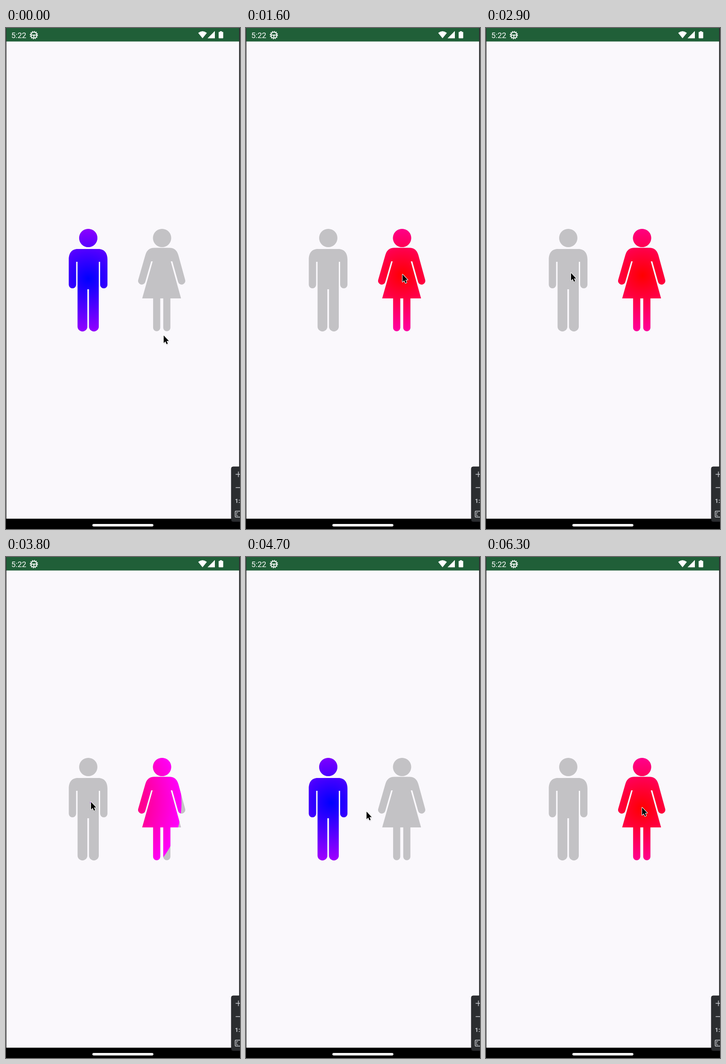
An HTML page for the animation above (6400 ms loop, 512 by 1095 pixels).

```html
<!DOCTYPE html>
<html lang="en">
<head>
<meta charset="utf-8">
<title>Gender picker</title>
<style>
  html, body { margin: 0; width: 100%; height: 100%; overflow: hidden; background: #2c2d2f; }
  svg { display: block; width: 100%; height: 100%; }
  text { font-family: Roboto, sans-serif; }
</style>
</head>
<body>
<svg viewBox="0 0 512 1095">
  <defs>
    <path id="man" d="M200 459a20 20 0 1 1-40 0a20 20 0 1 1 40 0Z
      M157 483H202C215 483 222 492 222 506V561a8 8 0 0 1-16 0V511H203V652.5a10.7 10.7 0 0 1-21.4 0V571H178V652.5a10.7 10.7 0 0 1-21.4 0V511H153.4V561a8 8 0 0 1-16 0V506C137.4 492 144 483 157 483Z"/>
    <path id="woman" d="M361.5 459a20 20 0 1 1-40 0a20 20 0 1 1 40 0Z
      M324 480.5H358C368 480.5 374 486 377 496L392 550.5a8 8 0 0 1-15.4 4.4L364 510H360.5L383 591H359.7V655a7.8 7.8 0 0 1-15.6 0V591H337.5V655a7.8 7.8 0 0 1-15.6 0V591H298L321 510H317.6L304.7 554.9a8 8 0 0 1-15.4-4.4L305 496C308 486 314 480.5 324 480.5Z"/>
    <clipPath id="manClip"><use href="#man"/></clipPath>
    <clipPath id="womanClip"><use href="#woman"/></clipPath>
    <radialGradient id="manFill" gradientUnits="userSpaceOnUse">
      <stop offset="0" stop-color="#00f"/><stop offset="1" stop-color="#f0f"/>
    </radialGradient>
    <radialGradient id="womanFill" gradientUnits="userSpaceOnUse">
      <stop offset="0" stop-color="#f00"/><stop offset="1" stop-color="#f0f"/>
    </radialGradient>
    <filter id="soft" x="-50%" y="-50%" width="200%" height="200%"><feGaussianBlur stdDeviation="1.2"/></filter>
  </defs>

  <rect width="512" height="1095" fill="#2c2d2f"/>
  <rect x="1" y="29" width="509" height="1044" fill="#faf8fc"/>

  <!-- status bar -->
  <rect x="1" width="509" height="29.5" fill="#205f38"/>
  <g fill="#fff">
    <text x="11.5" y="21.5" font-size="17">5:22</text>
    <g fill="none" stroke="#fff">
      <circle cx="61" cy="15.5" r="6.4" stroke-width="1.8"/>
      <circle cx="61" cy="15.5" r="8" stroke-width="2" stroke-dasharray="2.1 2.09"/>
      <path d="M55 15.5H67M61 15.5V21" stroke-width="1.9"/>
    </g>
    <path d="M420.5 10.8Q430 3.4 439.5 10.8L430 22.5Z"/>
    <path d="M441 22.5L457 6.5V22.5Z"/>
    <path d="M468.3 7h4v1.6h2q1 0 1 1V21.5q0 1-1 1h-8q-1 0-1-1V9.6q0-1 1-1h2Z"/>
  </g>

  <!-- figures -->
  <g fill="#c3c2c5"><use href="#man"/><use href="#woman"/></g>
  <g clip-path="url(#manClip)"><circle id="manSpot" fill="url(#manFill)"/></g>
  <g clip-path="url(#womanClip)"><circle id="womanSpot" fill="url(#womanFill)"/></g>

  <!-- navigation bar -->
  <rect y="1072.5" width="512" height="22.5" fill="#000"/>
  <rect x="189" y="1084" width="133.500" height="5.500" rx="2.750" fill="#fff"/>

  <!-- zoom panel -->
  <rect x="493" y="959" width="30" height="120" rx="4" fill="#2b2d30" stroke="#1e1f22"/>
  <g fill="none" stroke="#c9cbd0" stroke-width="1.500">
    <path d="M502.500 975.500H514M508.500 969.500V981.500M502.500 1004.500H514"/>
    <rect x="501.500" y="1056" width="14" height="13" rx="1"/>
    <path d="M504.500 1062.500V1059H508M504.500 1063V1066H508" stroke-width="1.200"/>
  </g>
  <text x="501" y="1038" font-size="13" font-weight="700" fill="#c9cbd0">1:1</text>

  <g id="cursor">
    <path d="M0 0V16.500L3.700 13L6.300 19L9 17.800L6.400 12H11.300Z" transform="translate(.5 1.500)" opacity=".35" filter="url(#soft)"/>
    <path d="M0 0V16.500L3.700 13L6.300 19L9 17.800L6.400 12H11.300Z" stroke="#fff" stroke-width="2" paint-order="stroke" stroke-linejoin="round"/>
  </g>
</svg>
<script>
const LOOP = 6400, STEP = 100, TWEEN = 500, RADIUS = 200;
const $ = id => document.getElementById(id);
const clamp = v => Math.min(1, Math.max(0, v));

// Pointer moves: start and end time, end point, bend of the path
const home = [345, 672];
const moves = [
  { from: 100, to: 500, end: [342.5, 538.5], bend: 0 },
  { from: 2100, to: 2900, end: [186, 535.5], bend: 0 },
  { from: 4400, to: 5000, end: [341.5, 547.5], bend: 15 },
];

// Taps: when, where, and who gets selected
const taps = [
  { at: -TWEEN, x: 180, y: 548, who: "man" },
  { at: 1240, x: 342.5, y: 541, who: "woman" },
  { at: 3768, x: 186, y: 537, who: "man" },
  { at: 5545, x: 341.5, y: 549.5, who: "woman" },
];

const easeInOut = p => p < .5 ? 2 * p * p : 1 - 2 * (1 - p) ** 2;

// cubic-bezier(.4, 0, .2, 1), solved by bisection
function fastOutSlowIn(x) {
  let lo = 0, hi = 1;
  for (let i = 0; i < 24; i++) {
    const s = (lo + hi) / 2, r = 1 - s;
    if (1.2 * s * r * r + .6 * s * s * r + s ** 3 < x) lo = s; else hi = s;
  }
  return lo * lo * (3 - 2 * lo);
}

function pointerAt(t) {
  let [x, y] = home;
  for (const m of moves) {
    const p = easeInOut(clamp((t - m.from) / (m.to - m.from)));
    x += (m.end[0] - x) * p;
    y += (m.end[1] - y) * p + m.bend * 4 * p * (1 - p);
  }
  return [x, y];
}

function setSpot(who, x, y, r) {
  const spot = $(who + "Spot"), fill = $(who + "Fill");
  for (const el of [spot, fill]) {
    el.setAttribute("cx", x);
    el.setAttribute("cy", y);
  }
  spot.setAttribute("r", r);
  fill.setAttribute("r", r + 1);
}

function render(t) {
  const tap = taps.filter(k => k.at <= t).pop();
  const grown = RADIUS * fastOutSlowIn(clamp((t - tap.at) / TWEEN));
  for (const who of ["man", "woman"]) {
    const selected = who === tap.who;
    const settled = selected && t - tap.at >= TWEEN;
    const r = selected ? grown : RADIUS - grown;
    setSpot(who, tap.x, tap.y, settled ? RADIUS : Math.max(0, r));
  }
  $("cursor").setAttribute("transform", `translate(${pointerAt(t)})`);
}

const start = performance.now();
function tick() {
  const t = (performance.now() - start) % LOOP;
  render(Math.floor(t / STEP) * STEP); // ten pictures a second
  requestAnimationFrame(tick);
}
tick();
</script>
</body>
</html>
```
